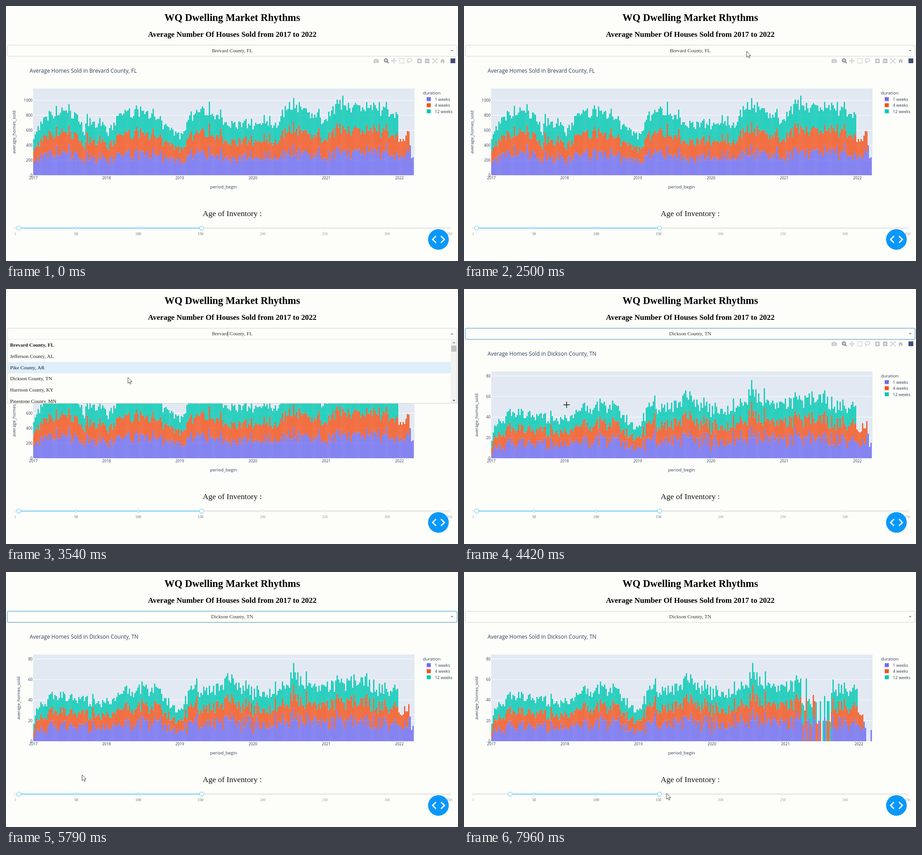
An HTML page with a canvas for the animation above (8000 ms loop, 997 by 562 pixels).

```html
<!DOCTYPE html>
<html lang="en">
<head>
<meta charset="utf-8">
<title>Housing dashboard</title>
<style>
html, body { margin: 0; width: 100%; height: 100%; overflow: hidden; background: #fdfdf9; }
canvas { display: block; }
</style>
</head>
<body>
<canvas id="stage" width="997" height="562"></canvas>
<script>
const ctx = document.getElementById('stage').getContext('2d');
const LOOP = 8000, WEEKS = 271, BASE = 373, TOP = 182, LEFT = 60, RIGHT = 901;
const OPEN = 2850, PICK = 4050, RELOAD = 4300, LEAVE = 5700, GRAB = 7100, DROP = 7400, FILTER = 7670;
const SERIF = '"Liberation Serif", Times, serif', SANS = '"Open Sans", sans-serif';
const SERIES = ['#706cf0', '#f5531a', '#02c9b2'];
const NAMES = ['1 weeks', '4 weeks', '12 weeks'];
const PAGE = '#fdfdf9', INK = '#2f405c', SKY = '#8dd8f8', PALE = '#e6e6e4';
const COUNTIES = ['Brevard County, FL', 'Jefferson County, AL', 'Pike County, AR',
  'Dickson County, TN', 'Harrison County, KY', 'Pipestone County, MN'];

// Pointer path: time, x, y
const PATH = [[40, 560, 330], [250, 600, 300], [500, 600, 300], [1290, 700, 250], [1630, 745, 323],
  [2130, 760, 260], [2500, 624, 100], [2800, 490, 97], [2950, 490, 97], [3540, 269, 195], [4100, 235, 196],
  [5210, 205, 401], [6460, 125, 500], [6790, 118, 498], [7020, 28, 490], [GRAB, 28, 490], [DROP, 102, 490],
  [7600, 102, 490], [7960, 447, 488]];

// Trend of sales: week, level
const brevard = makeData([[0, 480], [4, 650], [12, 790], [24, 840], [34, 720], [35.5, 480], [37, 720], [50, 660],
  [53, 550], [62, 820], [80, 850], [92, 660], [104, 510], [112, 780], [124, 860], [138, 690], [156, 640],
  [164, 720], [173, 650], [180, 900], [186, 930], [206, 730], [216, 930], [234, 900], [259, 820], [260, 640],
  [267, 830], [270, 720]], .17, .11, 7);
brevard[220] = [327, 333, 400]; // the bar whose label is shown

const dickson = makeData([[0, 20], [4, 36], [16, 44], [48, 36], [60, 40], [64, 48], [84, 50], [96, 38], [104, 28],
  [112, 49], [132, 50], [138, 59], [156, 46], [176, 48], [185, 63], [200, 50], [216, 53], [234, 60], [248, 48],
  [259, 50], [260, 38], [270, 50]], .28, .14, 23);

// A narrower age range thins out spring 2021 and the newest weeks
const chance = seeded(11);
const filtered = dickson.slice(0, 270).map((bar, i) => {
  const thin = i >= 219 && i <= 240;
  const kept = [.4, .6, .7].map(p => !thin || chance() < p);
  if (i >= 264) kept.fill(false, 1);
  if (i >= 266 && i < 269) kept[0] = false;
  return bar.map((v, k) => kept[k] ? v : 0);
});

const CHARTS = {
  brevard: {data: brevard, max: 1155, tick: 200, year: 161.5, titleX: 21},
  dickson: {data: dickson, max: 84.2, tick: 20, year: 161.5, titleX: 31},
  filtered: {data: filtered, max: 84.2, tick: 20, year: 162.15, titleX: 31}
};

function seeded(seed) {
  return () => (seed = (seed * 16807) % 2147483647) / 2147483647;
}

// Linear interpolation in rows of [position, ...values]
function at(keys, pos) {
  const found = keys.findIndex(k => k[0] >= pos);
  const n = found < 0 ? keys.length - 1 : Math.max(1, found);
  const a = keys[n - 1], b = keys[n];
  const f = Math.min(1, Math.max(0, (pos - a[0]) / (b[0] - a[0])));
  return a.slice(1).map((v, k) => v + (b[k + 1] - v) * f);
}

// Long averages follow the trend; weekly sales carry the noise and a month-end rise
function makeData(trend, spread, rise, seed) {
  const random = seeded(seed);
  for (let i = 0; i < 5; i++) random();
  return Array.from({length: WEEKS}, (_, i) => {
    const [level] = at(trend, i);
    const monthEnd = Math.max(0, Math.cos((i - 2.9) / 4.345 * 2 * Math.PI)) ** 2;
    const total = level * (1 + spread * (random() - .5) + rise * monthEnd * random() * 1.3);
    const top = Math.round(level * .34);
    const mid = Math.round(level * .325 * (1 + spread * (random() - .5)));
    const low = Math.max(Math.round(total) - top - mid, Math.round(level * .08));
    return [low, i < 268 ? mid : 0, i < 260 ? top : 0];
  });
}

function pointerAt(t) {
  const [x, y] = at(PATH, t);
  return {x, y};
}

function text(str, x, y, size, {font = SANS, color = INK, align = 'left', weight = ''} = {}) {
  ctx.font = `${weight} ${size}px ${font}`;
  ctx.fillStyle = color;
  ctx.textAlign = align;
  ctx.fillText(str, x, y);
}

function rect(x, y, w, h, color) {
  ctx.fillStyle = color;
  ctx.fillRect(x, y, w, h);
}

function line(points, color, width = 1) {
  ctx.beginPath();
  points.forEach(([x, y]) => ctx.lineTo(x, y));
  ctx.strokeStyle = color;
  ctx.lineWidth = width;
  ctx.stroke();
}

function polygon(points, color) {
  ctx.beginPath();
  points.forEach(([x, y]) => ctx.lineTo(x, y));
  ctx.closePath();
  ctx.fillStyle = color;
  ctx.fill();
}

function circle(x, y, r, fill, stroke, width = 1) {
  ctx.beginPath();
  ctx.arc(x, y, r, 0, 7);
  if (fill) { ctx.fillStyle = fill; ctx.fill(); }
  if (stroke) { ctx.strokeStyle = stroke; ctx.lineWidth = width; ctx.stroke(); }
}

function drawChart({data, max, tick, year, titleX}, county) {
  const scale = (BASE - TOP) / max, step = year / 52.14;
  text('Average Homes Sold in ' + county, 52, 147, 12);
  rect(LEFT, TOP, RIGHT - LEFT, BASE - TOP, '#e2e9f3');
  for (let v = 0; v < max; v += tick) {
    const y = BASE - v * scale;
    if (v) rect(LEFT, y - .5, RIGHT - LEFT, 1, '#fff');
    text(v, 58.5, y + 3.2, 8.4, {align: 'right'});
  }
  data.forEach((bar, i) => {
    let y = BASE;
    bar.forEach((v, k) => {
      y -= v * scale;
      rect(LEFT + step * i + .3, y, step - .6, v * scale, SERIES[k]);
    });
  });
  for (let n = 0; n < 6; n++) text(2017 + n, 60.3 + n * year, 382, 8.4, {align: 'center'});
  text('period_begin', 480, 402, 9.8, {align: 'center'});
  ctx.save();
  ctx.translate(titleX, 278);
  ctx.rotate(-Math.PI / 2);
  text('average_homes_sold', 0, 0, 9.8, {align: 'center'});
  ctx.restore();

  text('duration', 919.5, 195, 9.8);
  NAMES.forEach((name, k) => {
    rect(928, 201 + k * 13.4, 9, 8.5, SERIES[k]);
    text(name, 946, 208.7 + k * 13.4, 9);
  });
}

function drawTooltip({data, max, year}, p) {
  const scale = (BASE - TOP) / max, step = year / 52.14;
  const i = Math.floor((p.x - LEFT) / step), bar = data[i];
  if (!bar) return;
  const value = (BASE - p.y + 10) / scale;
  let sum = 0;
  const k = bar.findIndex(v => (sum += v) >= value);
  if (k < 0) return;
  const x = LEFT + (i + .5) * step, y = BASE - sum * scale, w = 113;
  const side = x + w > 980 ? -1 : 1, left = side > 0 ? x + 4 : x - 4 - w;
  const ink = k ? '#4a4040' : '#fff';
  polygon([[x, y], [x + 4 * side, y - 4], [x + 4 * side, y + 4]], SERIES[k]);
  rect(left, y - 19.5, w, 39, SERIES[k]);
  ctx.strokeStyle = ink;
  ctx.lineWidth = .5;
  ctx.strokeRect(left, y - 19.5, w, 39);
  const date = new Date(Date.UTC(2017, 0, 1 + 7 * i));
  const month = date.toLocaleString('en-US', {month: 'short', timeZone: 'UTC'});
  ['duration=' + NAMES[k], `period_begin=${month} ${date.getUTCFullYear()}`, 'average_homes_sold=' + bar[k]]
    .forEach((s, n) => text(s, left + 2.5, y - 9 + n * 12, 9.1, {color: ink}));
}

function drawTools() {
  const c = '#c3c4c8', y = 121;
  // camera
  rect(811, 118, 11, 7.5, c);
  rect(814, 116.5, 5, 2, c);
  circle(816.5, 121.7, 2.4, c, '#fff');
  // zoom
  circle(838, 120, 3.5, null, '#7b7c82', 2);
  line([[840.5, 122.5], [844, 126]], '#7b7c82', 2);
  rect(836.3, 119.6, 3.4, 1, '#7b7c82');
  // pan
  line([[851, y], [860, y]], c, 1.3);
  line([[855.5, 116.5], [855.5, 125.5]], c, 1.3);
  for (let n = 0; n < 4; n++) {
    ctx.save();
    ctx.translate(855.5, y);
    ctx.rotate(n * Math.PI / 2);
    polygon([[6, 0], [3.5, -2.3], [3.5, 2.3]], c);
    ctx.restore();
  }
  // box and lasso
  ctx.setLineDash([2, 1.3]);
  ctx.strokeStyle = c;
  ctx.lineWidth = 1.3;
  ctx.strokeRect(868, 116, 10, 10);
  ctx.setLineDash([]);
  ctx.beginPath();
  ctx.ellipse(890, 119.5, 5.2, 3.6, -.2, 0, 7);
  ctx.stroke();
  line([[886.5, 122], [886, 124], [888, 126]], c, 1.3);
  // zoom in and out
  [912, 929].forEach((x, n) => {
    rect(x - 5, 116, 10, 10, c);
    rect(x - 3, 120.3, 6, 1.4, '#fff');
    if (!n) rect(x - .7, 118, 1.4, 6, '#fff');
  });
  // autoscale
  for (const sx of [-1, 1]) {
    line([[946 - 3.5 * sx, 117.5], [946 + 3.5 * sx, 124.5]], c, 1.4);
    for (const sy of [-1, 1])
      line([[946 + 5.3 * sx, y + 2.5 * sy], [946 + 5.3 * sx, y + 5 * sy], [946 + 2.8 * sx, y + 5 * sy]], c, 1.2);
  }
  // home
  polygon([[957.3, 121.5], [963, 116], [968.7, 121.5]], c);
  rect(959, 121, 3, 4.7, c);
  rect(964, 121, 3, 4.7, c);
  rect(962, 120, 2, 2.5, c);
  rect(980.5, 115.5, 10.5, 10.5, '#3f4f75');
}

function drawDropdown(t, county, open, focus) {
  ctx.beginPath();
  ctx.roundRect(3, 86.5, 992, 24.5, 3);
  ctx.fillStyle = PAGE;
  ctx.fill();
  ctx.strokeStyle = focus ? '#70b3dc' : '#d6d6c6';
  ctx.lineWidth = focus ? 1.4 : 1;
  ctx.stroke();
  text(county, 499, 102, 11.2, {font: SERIF, color: '#333', align: 'center'});
  const d = open ? -1 : 1;
  polygon([[980.5, 98.8 - 1.8 * d], [987.5, 98.8 - 1.8 * d], [984, 98.8 + 1.8 * d]], '#999');
  if (!open) return;

  if ((t - OPEN) % 1000 < 750) rect(489.3, 93, .8, 12, '#333');
  rect(3, 111, 992, 141, PAGE);
  // The highlight trails the pointer a little
  const row = Math.max(0, Math.floor((pointerAt(t - 120).y - 111.3) / 24.8));
  ctx.save();
  ctx.beginPath();
  ctx.rect(3, 111, 992, 140.5);
  ctx.clip();
  rect(3.5, 111.3 + row * 24.8, 978, 24.8, '#deeefb');
  COUNTIES.forEach((name, n) =>
    text(name, 9, 127.3 + n * 24.7, 11.2, {font: SERIF, color: '#1c1c1c', weight: n ? '' : 'bold'}));
  ctx.restore();
  rect(981, 111.5, 13.5, 140, '#f2f2f1');
  rect(982, 124.5, 11.5, 13.5, '#c1c1c1');
  polygon([[985, 119.5], [991, 119.5], [988, 116.5]], '#8a8a8a');
  polygon([[985, 244.5], [991, 244.5], [988, 247.5]], '#505050');
  line([[3, 111], [3, 252], [995, 252], [995, 111]], '#d2d2c8');
  line([[3, 111], [995, 111]], '#ececec');
}

function drawSlider(low) {
  const high = 431.5, y = 489.5;
  rect(20, y - 1.3, 958, 2.6, PALE);
  rect(low, y - 1.3, high - low, 2.6, SKY);
  for (let n = 0; n < 8; n++) {
    const v = n * 50 || 1, x = 20 + (v - 1) * 2.745, active = x >= low && x <= high;
    circle(x, y, 2.3, '#fff', active ? SKY : PALE, 1.4);
    text(v, x, 505, 8.4, {font: SERIF, color: active ? '#666' : '#999', align: 'center'});
  }
  for (const x of [low, high]) circle(x, y, 4.5, '#fff', SKY, 1.4);
  circle(953.8, 514.5, 22.8, '#0898fb');
  for (const s of [-1, 1]) line([[954 + 5.5 * s, 507], [954 + 13 * s, 514.5], [954 + 5.5 * s, 522]], '#fff', 2.8);
}

function drawPointer({x, y}, cross) {
  if (cross) {
    line([[x - 7, y], [x + 7, y]], '#222', 1.6);
    line([[x, y - 7], [x, y + 7]], '#222', 1.6);
    return;
  }
  const shape = [[0, 0], [0, 13], [3, 10.3], [5, 14.6], [7, 13.7], [5.2, 9.5], [9, 9.3]].map(([a, b]) => [x + a, y + b]);
  polygon(shape, '#fff');
  line([...shape, shape[0]], '#333', .9);
}

function draw(t) {
  const p = pointerAt(t), open = t >= OPEN && t < PICK;
  const chart = t < RELOAD ? CHARTS.brevard : t < FILTER ? CHARTS.dickson : CHARTS.filtered;
  const inPlot = !open && p.x > LEFT && p.x < RIGHT && p.y > TOP && p.y < BASE;
  const heading = {font: SERIF, color: '#000', align: 'center', weight: 'bold'};
  rect(0, 0, 997, 562, PAGE);
  text('WQ Dwelling Market Rhythms', 499, 32.6, 22.3, heading);
  text('Average Number Of Houses Sold from 2017 to 2022', 499, 68, 16.9, heading);
  drawChart(chart, COUNTIES[t < RELOAD ? 0 : 3]);
  if (t < LEAVE) drawTools();
  if (t >= 40 && inPlot) drawTooltip(chart, p);
  drawDropdown(t, COUNTIES[t < PICK ? 0 : 3], open, t >= PICK && t < GRAB);
  text('Age of Inventory :', 499, 463, 17.6, {font: SERIF, color: '#111', align: 'center'});
  drawSlider(28 + 74 * Math.min(1, Math.max(0, (t - GRAB) / (DROP - GRAB))));
  if (t >= 40) drawPointer(p, inPlot);
}

function frame() {
  draw(performance.now() % LOOP);
  requestAnimationFrame(frame);
}
frame();
</script>
</body>
</html>
```
